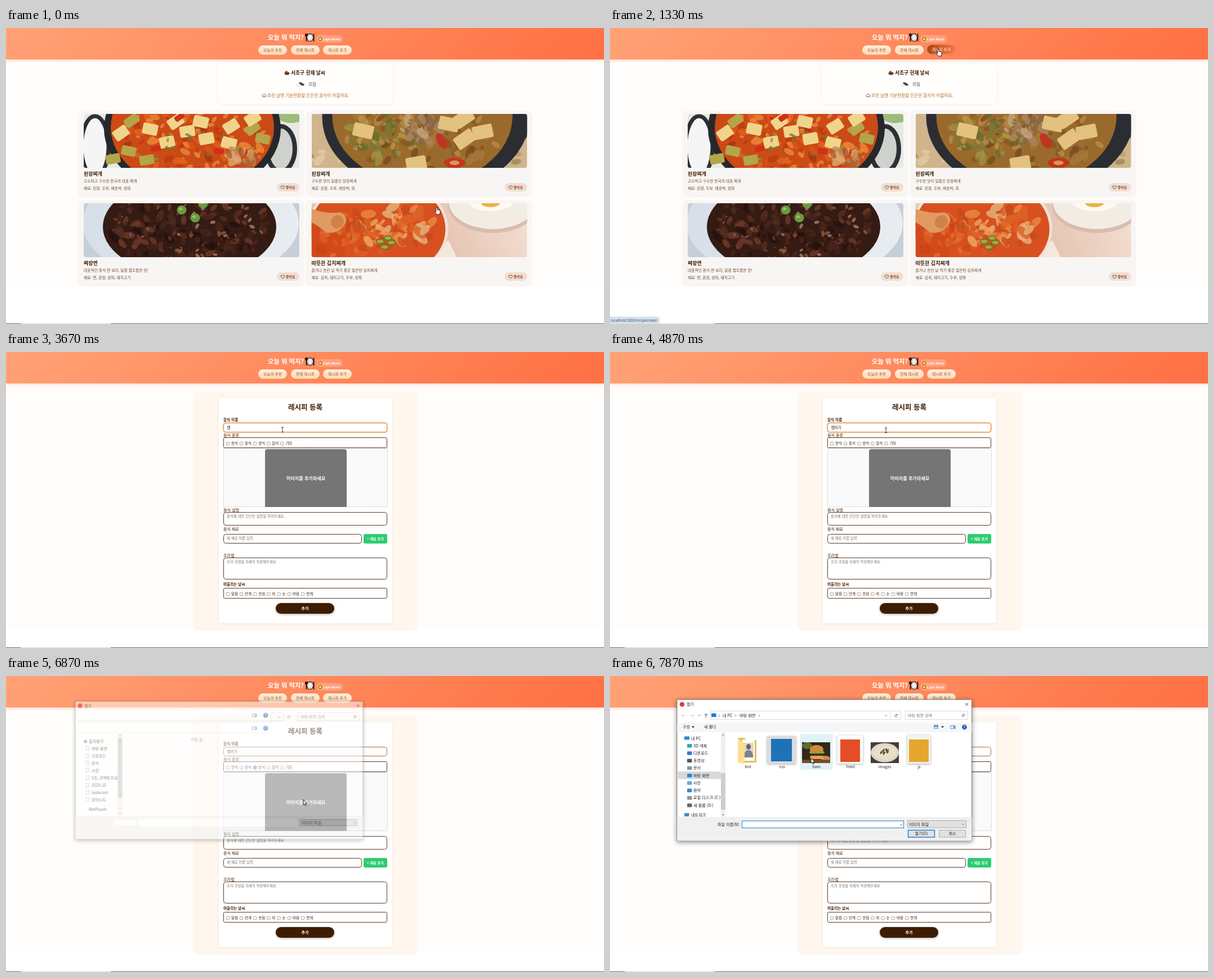
These frames come from a looping animation (1062 px wide and 527 px high, 8 s). An HTML page:

```html
<!DOCTYPE html>
<html lang="ko">
<head>
<meta charset="utf-8">
<title>오늘 뭐 먹지?</title>
<style>
html,body{margin:0;width:100%;height:100%;overflow:hidden;background:#fff}
svg{display:block;width:100%;height:100%}
text{font-family:"Noto Sans CJK KR","Noto Sans CJK",sans-serif;white-space:pre}
.b{font-weight:700}.m{text-anchor:middle}
.head{filter:drop-shadow(0 1px 3px #ff704355)}
.soft{filter:drop-shadow(0 1px 2px #a0522d1e)}
.pop{filter:drop-shadow(0 1px 2px #0005)}
.win{filter:drop-shadow(0 2px 4px #0007)}
.blur{filter:blur(.6px)}
.glow{opacity:0}
.list,.form,.card2,.card4,.card2 .glow,.navlift,.navhot,.status,.focus,.picked,.dialog,.loading,.loaded,
.over0,.over1,.over2,.cursor,.hand,.beam,.arrow{animation:8s linear infinite}
.list,.form,.focus,.picked,.loading,.loaded,.over0,.over1,.over2,.hand,.beam,.arrow{animation-timing-function:step-end}
.list{animation-name:list}.form{animation-name:form}.card2{animation-name:card2}.card4{animation-name:card4}
.card2 .glow{animation-name:glow}.navlift{animation-name:navlift}.navhot{animation-name:navhot}
.status{animation-name:status}.focus{animation-name:focus}.picked{animation-name:picked}
.dialog{animation-name:dialog;transform-origin:286px 168px}
.loading{animation-name:loading}.loaded{animation-name:loaded}
.over0{animation-name:over0}.over1{animation-name:over1}.over2{animation-name:over2}
.cursor{animation-name:cursor}.hand{animation-name:hand}.beam{animation-name:beam}.arrow{animation-name:arrow}
@keyframes list{0%{opacity:1}18.2%,100%{opacity:0}}
@keyframes form{0%{opacity:0}18.2%,100%{opacity:1}}
@keyframes card2{0%,2.1%{transform:none}3.7%{transform:translateY(-1.4px)}4.2%{transform:translateY(-1.1px)}7.4%,100%{transform:none}}
@keyframes card4{0%,.9%{transform:none}2%{transform:translateY(-.9px)}5%,100%{transform:none}}
@keyframes glow{0%,2.1%{opacity:0}3.7%,4.3%{opacity:1}7.4%,100%{opacity:0}}
@keyframes navlift{0%,9.6%{transform:none}13%,23%{transform:translateY(-1px)}26.5%,100%{transform:none}}
@keyframes navhot{0%,9.6%{opacity:0}13%,23%{opacity:1}26.5%,100%{opacity:0}}
@keyframes status{0%,12%{opacity:0}13%,25.5%{opacity:1}27%,100%{opacity:0}}
@keyframes focus{0%{opacity:0}28.4%{opacity:1}73%,100%{opacity:0}}
@keyframes picked{0%{opacity:0}74.1%,100%{opacity:1}}
@keyframes dialog{0%,85.4%{opacity:0;transform:scale(.976)}85.5%,86.2%{opacity:.5;transform:scale(.976)}88.3%,100%{opacity:1;transform:none}}
@keyframes loading{0%{opacity:1}90%,100%{opacity:0}}
@keyframes loaded{0%{opacity:0}90%,100%{opacity:1}}
@keyframes over0{0%{opacity:0}97.6%,100%{opacity:1}}
@keyframes over1{0%{opacity:0}96.6%{opacity:1}97.6%,100%{opacity:0}}
@keyframes over2{0%{opacity:0}94.8%{opacity:1}96.6%,100%{opacity:0}}
@keyframes cursor{
0%,.9%{transform:translate(765px,319px)}2.5%{transform:translate(735px,215px)}
4.1%,5%{transform:translate(676px,108px)}6.6%{transform:translate(628px,72px)}
10%{transform:translate(587px,41px)}11.6%,21.6%{transform:translate(583px,37px)}
25%{transform:translate(560px,75px)}30%{transform:translate(491px,136px)}
32.5%,58.3%{transform:translate(491px,138px)}60.9%{transform:translate(490px,139px)}
70.9%,73.4%{transform:translate(452px,163px)}80%,89%{transform:translate(528px,220px)}
95.9%{transform:translate(488px,150px)}98.3%,100%{transform:translate(357px,146px)}}
@keyframes hand{0%{opacity:1}3.6%{opacity:0}9.6%{opacity:1}23%{opacity:0}66%{opacity:1}75.5%,100%{opacity:0}}
@keyframes beam{0%{opacity:0}28.4%{opacity:1}62%,100%{opacity:0}}
@keyframes arrow{0%{opacity:0}3.6%{opacity:1}9.6%{opacity:0}23%{opacity:1}28.4%{opacity:0}62%{opacity:1}66%{opacity:0}75.5%,100%{opacity:1}}
</style>
</head>
<body>
<svg id="stage" viewBox="0 0 1062 527"></svg>
<script>
const BROWN = '#3e1c00', TAN = '#6b4423';
const rect = (x, y, w, h, r, fill, more = '') =>
  `<rect x="${x}" y="${y}" width="${w}" height="${h}" rx="${r}" fill="${fill}" ${more}/>`;
const box = (x, y, w, h, r, fill, stroke, more = '') =>
  rect(x + .5, y + .5, w - 1, h - 1, r, fill, `stroke="${stroke}" ${more}`);
const oval = (x, y, rx, ry, fill, more = '') =>
  `<ellipse cx="${x}" cy="${y}" rx="${rx}" ry="${ry}" fill="${fill}" ${more}/>`;
const shape = (d, fill) => `<path d="${d}" fill="${fill}"/>`;
const line = (d, color = '#555', width = .8) =>
  `<path d="${d}" fill="none" stroke="${color}" stroke-width="${width}"/>`;
// y is the middle of the line of text
const text = (x, y, size, s, fill = BROWN, cls = '') =>
  `<text x="${x}" y="${y + size * .37}" font-size="${size}" fill="${fill}" class="${cls}">${s}</text>`;
const group = (cls, body, more = '') => `<g class="${cls}" ${more}>${body}</g>`;
const at = (x, y, body) => group('', body, `transform="translate(${x} ${y})"`);
const chevron = (x, y, s = 1) => line(`M${x - 2} ${y - s}l2 ${2 * s} 2 ${-2 * s}`);
const grad = (id, x1, y1, x2, y2, a, b) =>
  `<linearGradient id="${id}" gradientUnits="userSpaceOnUse" x1="${x1}" y1="${y1}" x2="${x2}" y2="${y2}">
  <stop stop-color="${a}"/><stop offset="1" stop-color="${b}"/></linearGradient>`;

function random(seed) {
  return () => (seed = seed * 16807 % 2147483647) / 2147483647;
}
function blobs(seed, n, cx, cy, rx, ry, size, colors) {
  const rnd = random(seed * 7919);
  return Array.from({length: n}, () => {
    const a = rnd() * 6.283, d = Math.sqrt(rnd()), s = size * (.4 + rnd());
    const x = cx + rx * d * Math.cos(a), y = cy + ry * d * Math.sin(a);
    return oval(x, y, s, s * .55, colors[rnd() * colors.length | 0],
      `transform="rotate(${rnd() * 180} ${x} ${y})" opacity=".8"`);
  }).join('');
}
const chunks = (spots, w, h, fill) => spots.map(([x, y], i) =>
  rect(x - w / 2, y - h / 2, w, h, 3, fill, `transform="rotate(${i * 47 % 70 - 35} ${x} ${y})"`)).join('');

const redStew = () => rect(0, 0, 383, 96, 0, '#e6e9e2') + shape('M338 0Q352 22 383 14V0Z', '#9dbb7a') +
  oval(20, 58, 24, 54, '#f4f5f4', 'stroke="#2c2f35" stroke-width="7"') +
  oval(350, 62, 25, 40, '#cfd2cc', 'stroke="#2c2f35" stroke-width="8"') +
  oval(193, 26, 157, 118, '#26282c') + oval(193, 24, 145, 109, '#cb4a16') +
  blobs(3, 150, 193, 38, 132, 70, 8, ['#e2611c', '#bd3a10', '#dc5218', '#ec8a38', '#a33510', '#e58a3c']) +
  chunks([[85, 12], [80, 66], [52, 80], [300, 26], [318, 44], [112, 82]], 26, 17, '#b3a548') +
  chunks([[66, 34], [118, 27], [148, 50], [163, 14], [208, 14], [218, 44], [262, 22], [258, 52], [184, 31], [300, 8]], 27, 20, '#f0d48c') +
  chunks([[170, 6], [240, 66], [128, 62]], 18, 10, '#cf3019') +
  blobs(9, 26, 285, 76, 30, 14, 8, ['#c98852', '#ad6332', '#e0a871']) +
  blobs(5, 20, 190, 60, 110, 30, 4, ['#6d7a2c', '#93983a']);

const brownStew = () => rect(0, 0, 383, 96, 0, '#cfb48c') +
  blobs(4, 80, 190, 48, 270, 70, 9, ['#b89a6c', '#e2cba6', '#a58458']) +
  rect(335, 8, 48, 38, 8, '#303238') + oval(203, 6, 184, 136, '#2b2d32') + oval(197, 4, 160, 122, '#9a6a2c') +
  blobs(6, 130, 200, 36, 140, 64, 9, ['#a8783a', '#855624', '#b88a48', '#9a6c34', '#744c22']) +
  blobs(8, 45, 128, 42, 66, 42, 9, ['#7c7a34', '#989444', '#66692e', '#b59a46']) +
  blobs(12, 36, 195, 24, 36, 24, 9, ['#a98560', '#8b6644', '#c4a47c']) +
  chunks([[272, 45], [244, 18], [304, 32], [270, 8], [92, 30], [186, 88]], 36, 24, '#e2c27e') +
  oval(231, 48, 15, 8, '#bf3520', 'transform="rotate(60 231 48)"') + oval(254, 87, 19, 9, '#c53420') + oval(254, 87, 9, 4, '#dd9456');

const blackNoodles = () => rect(0, 0, 383, 96, 0, '#c6cfd9') + oval(190, 36, 192, 104, 'url(#bowl)') +
  oval(188, 42, 154, 88, '#341b14') +
  blobs(11, 240, 188, 42, 144, 72, 8, ['#43221a', '#24110e', '#582e20', '#6b3a28', '#361a13', '#4b2519']) +
  blobs(15, 40, 188, 44, 130, 58, 4, ['#8e5a3c', '#7a4830', '#a68068']) +
  [[174, 12], [198, 26], [212, 1]].map(([x, y]) => oval(x, y, 8.5, 8, '#6b9a40') + oval(x - 2, y - 2, 3, 2.5, '#98c069')).join('');

const kimchiStew = () => rect(0, 0, 383, 96, 0, 'url(#table)') + shape('M243 66L258 96H205Z', '#f4e7de') +
  oval(322, 3, 80, 50, '#d9bcac') + oval(322, -2, 78, 48, '#f2ece5') + oval(318, -6, 42, 20, '#fffaf0') + oval(318, -1, 17, 8, '#eab24c') +
  oval(118, 45, 125, 94, '#f0e0d6') + oval(118, 46, 120, 90, '#d8501f') + rect(0, 20, 60, 76, 0, '#d34a1a') +
  blobs(17, 60, 70, 60, 75, 38, 8, ['#dc5a24', '#cc4416', '#e0702e']) +
  blobs(19, 80, 148, 38, 74, 40, 11, ['#ea8a42', '#dc6226', '#eea868', '#c84a1c', '#e4b480']) +
  shape('M0 10Q30 20 50 16 66 22 60 36 48 56 26 52 12 40 0 34Z', '#e09a62') + oval(46, 33, 11, 12, '#cd8248', 'transform="rotate(35 46 33)"') +
  [[122, 68], [136, 62], [130, 78], [142, 70]].map(([x, y]) => oval(x, y, 7, 4, '#a9a840', 'stroke="#6f7628" stroke-width="2"')).join('');

function card(x, y, cls, photo, title, note, parts) {
  const like = rect(351, 128, 40, 15, 7.5, '#f0ded2') +
    line('M361.5 139l-3-3a1.8 1.8 0 0 1 3-2.2 1.8 1.8 0 0 1 3 2.2Z', '#4a2412') + text(367, 135.5, 6, '좋아요', '#8f431c', 'b');
  return at(x, y, group(cls, rect(0, 0, 398, 150, 6, '#f8f6f4', 'class="soft"') +
    group('glow', rect(0, 0, 398, 150, 6, '#fff9f2', 'class="soft"')) +
    group('', group('blur', photo), 'clip-path="url(#photo)" transform="translate(8 5)"') +
    text(8, 111.5, 9, title, BROWN, 'b') + text(8, 125, 6.75, note, TAN) + text(8, 138, 6.75, '재료: ' + parts, TAN) + like));
}

const navButton = (x, label) => rect(x, 31, 51, 16.5, 8.2, 'url(#cream)') + text(x + 25.5, 39.2, 6.75, label, '#a04e1c', 'm');
const header = group('head', rect(0, 0, 1062, 56, 0, 'url(#sunset)')) + text(465, 17, 11.3, '오늘 뭐 먹지?', '#fff', 'b') +
  line('M533.5 10v14M532 10v4h3v-4M546.5 10v14', '#2b1a14', 1.8) + oval(540, 17, 5.6, 6.6, '#fff', 'stroke="#2b1a14" stroke-width="1.2"') +
  oval(540, 17, 3.3, 4, '#f3f3f3', 'stroke="#999" stroke-width=".6"') +
  rect(551, 13, 47, 13, 6, '#ffffff38') + oval(558, 19.7, 3, 3, '#ffd93b', 'stroke="#5a3a10" stroke-width=".8"') +
  `<text x="563" y="21.8" font-size="5.7" fill="#fff" class="b" style="font-family:'Liberation Sans',sans-serif">Light Mode</text>` +
  navButton(448, '오늘의 추천') + navButton(506, '전체 레시피') +
  group('navlift', navButton(563, '레시피 추가') + group('navhot', rect(563, 31, 51, 16.5, 8.2, 'url(#ember)', 'class="soft"') +
    text(588.5, 39.2, 6.75, '레시피 추가', '#fff', 'm')));

const weather = rect(376, 63, 311, 72, 8, '#fffefd', 'class="soft"') +
  oval(499, 81, 4.5, 2.4, '#5a2f12') + oval(498, 78.8, 2.5, 2.2, '#8a4a18') +
  text(506, 80, 8.7, '서초구 현재 날씨', BROWN, 'b') +
  oval(521, 102, 6.5, 2.8, '#f0f0f0') + oval(524, 99, 3.8, 2, '#494949', 'transform="rotate(25 524 99)"') + oval(527, 101, 3, 1.4, '#333') +
  text(537, 100.5, 7.7, '흐림', '#4d4d58') +
  `<path d="M456 122.5a2 2 0 0 1 .5-3.6 2.2 2.2 0 0 1 4 0 1.9 1.9 0 0 1 .4 3.6Z" fill="#fff" stroke="#333" stroke-width=".8"/>` +
  text(464, 120, 7.6, '흐린 날엔 기분전환할 든든한 음식이 어울려요.', '#b8661c');

const list = rect(0, 56, 1062, 404, 0, '#fffdfb') + weather +
  card(130, 148, '', redStew(), '된장찌개', '고소하고 구수한 한국의 대표 찌개', '된장, 두부, 애호박, 양파') +
  card(534.5, 148, 'card2', brownStew(), '된장찌개', '구수한 맛이 일품인 된장찌개', '된장, 두부, 애호박, 파') +
  card(130, 307, '', blackNoodles(), '짜장면', '대표적인 중식 면 요리, 달콤 짭조름한 맛!', '면, 춘장, 양파, 돼지고기') +
  card(534.5, 307, 'card4', kimchiStew(), '따뜻한 김치찌개', '춥거나 흐린 날 먹기 좋은 얼큰한 김치찌개', '김치, 돼지고기, 두부, 양파');

function radios(y, labels) {
  let x = 394;
  return labels.map(label => {
    const item = oval(x, y, 3, 3, '#fff', 'stroke="#777" stroke-width=".7"') + text(x + 6, y, 6.5, label);
    x += label.length > 1 ? 24.1 : 18.4;
    return item;
  }).join('');
}
const field = (y, h, hint = '', w = 291) =>
  box(386, y, w, h, 4, '#fff', '#5b3a26') + text(392, y + 8, 6.4, hint, '#757575');
const form = rect(0, 56, 1062, 434, 0, '#fffdfb') +
  rect(335, 72, 394, 421, 6, '#fff7ed', 'class="soft"') + rect(378, 82, 308, 401, 4, '#fff', 'class="soft"') +
  text(531.5, 98.5, 12.5, '레시피 등록', BROWN, 'b m') + text(386, 120.5, 6.65, '음식 이름', BROWN, 'b') +
  box(386, 126, 291, 17, 4, '#fff', '#a86f45') +
  group('focus', box(385, 125, 293, 19, 5, 'none', '#ffd3a8', 'stroke-width="2"') + box(386, 126, 291, 17, 4, '#fff', '#d98a45')) +
  `<text id="typed" x="392.5" y="137.4" font-size="6.5" fill="#222"></text>` + rect(392.5, 131.5, .8, 8, 0, '#222', 'id="caret"') +
  text(386, 148, 7.1, '음식 종류') + box(386, 152, 291, 19, 2, '#fff', '#5b3a26') +
  radios(163, ['한식', '중식', '양식', '일식', '기타']) +
  group('picked', oval(442.2, 163, 2.8, 2.8, '#fff', 'stroke="#1a73e8" stroke-width="1"') + oval(442.2, 163, 1.7, 1.7, '#1a73e8')) +
  box(386, 171, 292, 105, 1, '#fafafa', '#c4c4c4', 'stroke-dasharray="2 1.5"') +
  shape('M460 276V177q0-4 4-4H601q4 0 4 4V276Z', '#757575') + text(532.5, 225.5, 8.1, '이미지를 추가하세요', '#fff', 'b m') +
  text(386, 281, 7.1, '음식 설명') + field(285, 24, '음식에 대한 간단한 설명을 적어주세요.') +
  text(386, 315, 7, '음식 재료') + field(324, 17, '새 재료 이름 입력', 246) +
  rect(635, 324, 42, 17, 3, '#2ecc71') + text(656, 332.5, 6.2, '+ 재료 추가', '#fff', 'b m') +
  text(386, 362, 7.2, '조리법') + field(366, 39, '조리 과정을 자세히 작성해주세요.') +
  text(386, 414, 6.6, '어울리는 날씨', BROWN, 'b') + box(386, 420, 291, 19, 2, '#fff', '#5b3a26') +
  radios(431, ['맑음', '안개', '흐림', '비', '눈', '바람', '번개']) +
  rect(479, 447, 104, 19, 9.5, BROWN, 'class="pop"') + text(531, 456.5, 7.1, '추가', '#fff', 'b m');

const INK = '#222', GREY = '#777';
const cross = (x, y) => line(`M${x - 2.5} ${y - 2.5}l5 5m0-5l-5 5`, '#222');
const lens = (x, y) => oval(x + 1, y - 1, 1.8, 1.8, 'none', 'stroke="#444" stroke-width=".8"') + line(`M${x - .5} ${y + .5}l-2 2`);
const help = (x, y) => oval(x, y, 4.4, 4.4, '#1b62b5') + text(x, y, 6.5, '?', '#fff', 'b m');
const pane = (x, y) => box(x - 4.5, y - 3, 9, 6, 0, '#fff', '#3c78b4', 'stroke-width=".8"') + rect(x + 1, y - 3, 3, 6, 0, '#5a9bd5');
const reload = (x, y) => line(`M${x + 2} ${y - 1}a2.3 2.3 0 1 0 .2 2M${x + 2} ${y - 3}v2h-2`);

const loading = text(139, 53, 6.9, '열기', INK) + oval(131.5, 53, 4.2, 4.2, '#db4437') + cross(625, 53) +
  pane(441, 70) + help(461, 70) + pane(441, 93) + help(461, 93) + rect(123, 78, 351, 6, 0, '#f2f2f2') + line('M123 101H474', '#ddd') +
  box(470, 65, 24, 15, 0, '#fff', '#ddd') + chevron(485, 73) + reload(502, 73) + box(517, 65, 110, 15, 0, '#fff', '#ddd') +
  text(523, 72.5, 7.1, '바탕 화면 검색', GREY) + lens(619, 73) +
  text(147, 116, 7, '즐겨찾기', INK) + shape('M141 112l1.2 2.8 3 .3-2.3 2 .8 3-2.7-1.6-2.7 1.6.8-3-2.3-2 3-.3Z', '#3b96dd') +
  ['바탕 화면', '다운로드', '문서', '사진', '5조_리액트프로', '2025-10', 'tastecast', '강의노트'].map((s, i) =>
    box(141.5, 125 + 13 * i, 6, 8, 0, '#fff', '#999', 'stroke-width=".7"') + text(152, 129 + 13 * i, 7, s, INK)).join('') +
  text(147, 237, 7, 'NetPouch', INK) + rect(198, 101, 9, 147, 0, '#f0f0f0') + rect(198.5, 110, 8, 107, 0, '#c4c4c4') +
  line('M200.5 107l2-2 2 2') + chevron(202.5, 245) + text(328, 113, 7, '작업 중...', GREY) +
  rect(123, 249, 511, 41.5, 0, '#f0f0f0') + rect(193, 257, 39, 8, 0, '#fff') + rect(235, 255, 282, 13, 0, '#fff') +
  box(522, 255, 102, 12, 0, '#d9d9d9', '#999') + text(525, 261, 7.2, '이미지 파일', INK) + chevron(619, 261);

const places = [['3D 개체', '#35a0c8'], ['다운로드', '#2b7cd3'], ['동영상', '#555'], ['문서', '#8898a8'], ['바탕 화면', '#1e88e5'],
  ['사진', '#6aa8d8'], ['음악', '#2a8fd8'], ['로컬 디스크 (C:)', '#8a949c'], ['새 볼륨 (D:)', '#666']];
const burger = rect(341, 118, 50, 37, 0, '#33261a') + oval(350, 124, 9, 6, '#5f6a30') + oval(383, 147, 8, 5, '#c98f45') +
  oval(367, 131, 12, 8, '#d48a3a') + rect(354, 134, 27, 4, 2, '#87a83a') + rect(355, 138, 25, 5, 2, '#54291a') +
  rect(355, 142, 25, 6, 3, '#dfa254') + rect(341, 149, 50, 6, 0, '#7b4b26');
const porridge = rect(463, 118, 50, 37, 0, '#4a3a32') + oval(488, 136.5, 25, 17, '#d9d5d0') + oval(488, 136, 21, 13, '#e9dfc6') +
  blobs(21, 14, 488, 135, 8, 5, 2.5, ['#2e2a24', '#6e5a38', '#50683a']);
const folder = shape('M227 110h12l3 4h18v40H227Z', '#e9bd55') + rect(235, 113, 22, 38, 0, '#fff') + rect(237, 119, 18, 26, 0, '#dcd6d0') +
  oval(246, 126, 4, 5, '#6d625c') + shape('M238 145q0-13 8-13t8 13Z', '#7b8290') + shape('M227 111l12 8v37l-12-2Z', '#fbdf8b');
const hover = x => rect(x, 103, 58, 64, 0, '#e0f2f7');
const files = group('over0', hover(337.5)) + group('over1', hover(398.5)) + group('over2', hover(459)) + folder +
  rect(279, 107, 51, 49, 0, '#dcdcdc', 'class="pop"') + rect(286, 112, 37, 40, 0, '#1f72b8') + burger +
  rect(404, 106, 45, 50, 0, '#fff', 'class="pop"') + rect(409, 113, 35, 40, 0, '#e44d26') + porridge +
  rect(528, 105, 41, 51, 0, '#f3f3f3', 'class="pop"') + rect(531, 113, 35, 40, 0, '#e6a62e') +
  ['bnt', 'css', 'ham', 'html', 'images', 'js'].map((s, i) => text(245 + 60.8 * i, 161.5, 6.9, s, INK, 'm')).join('');

const loaded = rect(119.5, 83, 523, 17, 0, '#f5f6f7') + oval(128, 50.5, 4.3, 4.3, '#db4437') + text(136, 50.5, 6.9, '열기', INK) + cross(633.5, 50.5) +
  line('M134 70.5h-7l3-3m-3 3l3 3M142 70.5h7l-3-3m3 3l-3 3', '#c4c4c4') + chevron(158.5, 70, .6) + line('M170.5 74v-7l-3 3m3-3l3 3', '#333') +
  box(178, 62, 339, 16, 0, '#fff', '#d9d9d9') + line('M498.5 62v16', '#d9d9d9') + rect(180, 66.5, 8.5, 6.5, 0, '#1c7cd0') +
  [194, 223, 265].map(x => line(`M${x - 1} 68.5l2 2-2 2`)).join('') + text(200, 70, 7.1, '내 PC', INK) + text(230, 70, 7.2, '바탕 화면', INK) +
  chevron(490, 70.5) + reload(508, 70.5) + box(524, 62, 112, 16, 0, '#fff', '#d9d9d9') + text(529, 70, 7.1, '바탕 화면 검색', GREY) + lens(627, 70.5) +
  text(129, 90.5, 7, '구성', INK) + shape('M145 89.5h5l-2.5 3Z', INK) + text(167, 90.5, 7, '새 폴더', INK) +
  rect(575, 87, 8, 7, 0, '#6b9fc6') + rect(576, 91, 6, 2, 0, '#dfead6') + shape('M588 89.5h5l-2.5 3Z', INK) + pane(609, 91) + help(629.5, 91) +
  rect(119.5, 170, 78, 13.5, 0, '#d9d9d9') + rect(132, 107.5, 9, 6, 0, '#2b8ad6') + text(144, 111, 7.1, '내 PC', INK) +
  places.map(([s, color], i) => rect(137, 121 + 13.25 * i, 8.5, 6.5, 1, color) + text(148, 124 + 13.25 * i, 7.2, s, INK)).join('') +
  rect(132, 244, 8.5, 6, 1, '#3b8fd0') + text(144, 247, 7.2, '네트워크', INK) +
  rect(197, 100, 8, 151, 0, '#f0f0f0') + rect(197, 173, 8, 65, 0, '#cdcdcd') + line('M199 106l2-2 2 2') + chevron(201, 247) + files +
  rect(119.5, 251, 523, 42.5, 0, '#f0f0f0') + text(191, 264, 7.1, '파일 이름(N):', INK) + box(234, 257.5, 288, 13.5, 0, '#fff', '#2b7cd3') + chevron(517, 265) +
  box(528, 257, 105, 13.5, 0, '#e1e1e1', '#aaa') + text(531, 264, 7.2, '이미지 파일', INK) + chevron(627, 264) +
  box(529, 274, 48, 13.5, 0, '#e1e1e1', '#1f78d1', 'stroke-width="1.4"') + text(553, 280.5, 7, '열기(O)', INK, 'm') +
  box(584, 274, 48, 13.5, 0, '#e1e1e1', '#adadad') + text(608, 280.5, 6.9, '취소', INK, 'm');

const dialog = group('dialog', group('win', box(118.5, 41.5, 524.5, 252.5, 0, '#fff', '#666', 'stroke-width=".8"')) +
  group('loading', loading, 'transform="translate(286 168) scale(1.0246) translate(-286 -168)"') + group('loaded', loaded));

const status = group('status', shape('M0 514H85q3 0 3 3V527H0Z', '#d3e0ee') +
  `<text x="2" y="523" font-size="6.35" fill="#444" style="font-family:'Open Sans',sans-serif">localhost:3000/recipecreate</text>`);
const ink = 'fill="#fff" stroke="#111" stroke-width=".9" stroke-linejoin="round"';
const cursor = group('cursor',
  `<path class="hand" d="M-1.2 1Q0-.8 1.2 1V4.6L5 5.4Q6.4 5.8 6.2 8L5.2 13H.2L-3.6 8.6Q-3.4 6.8-1.2 8.4Z" ${ink}/>
  <path class="arrow" d="M0 0V9.4L2.2 7.4 3.8 10.8 5.3 10.1 3.8 6.9H6.6Z" ${ink}/>` +
  group('beam', line('M-2-4H2M0-4V4.5M-2 4.5H2', '#222', .9)));

document.getElementById('stage').innerHTML = `<defs><clipPath id="photo"><rect width="383" height="96" rx="4"/></clipPath>` +
  grad('sunset', 251.5, -251.5, 810.5, 307.5, '#ffa276', '#ff7043') + grad('cream', 0, 31, 0, 47, '#ffeedb', '#ffdcb9') +
  grad('ember', 563, 31, 614, 47, '#a8440c', '#ff7a45') + grad('bowl', 0, 0, 383, 96, '#d6dee8', '#e9edf1') +
  grad('table', 240, 90, 383, 20, '#e6c3b0', '#f2dfd4') + '</defs>' +
  group('list', list) + group('form', form) + header + dialog +
  rect(0, 526, 1062, 1, 0, '#566a72') + rect(26, 526, 160, 1, 0, '#cfd6da') + status + cursor;

// [ms, text, caret shown]
const typing = [[0, '', 0], [2270, '', 1], [2800, '', 0], [3060, 'goaqjrj', 1], [3190, '', 1], [3650, '햄', 0], [3860, '햄ㅂ', 0],
  [3920, '햄버', 0], [4060, '햄벅', 0], [4120, '햄버거', 1], [4660, '햄버거', 0], [5200, '햄버거', 1], [5720, '햄버거', 0]];
const typed = document.getElementById('typed'), caret = document.getElementById('caret');
const start = performance.now();
function frame() {
  const t = (performance.now() - start) % 8000;
  const [, word, shown] = typing.findLast(step => step[0] <= t);
  typed.textContent = word;
  caret.setAttribute('x', 392.5 + (word ? typed.getComputedTextLength() : 0));
  caret.setAttribute('opacity', shown);
  requestAnimationFrame(frame);
}
frame();
</script>
</body>
</html>
```
